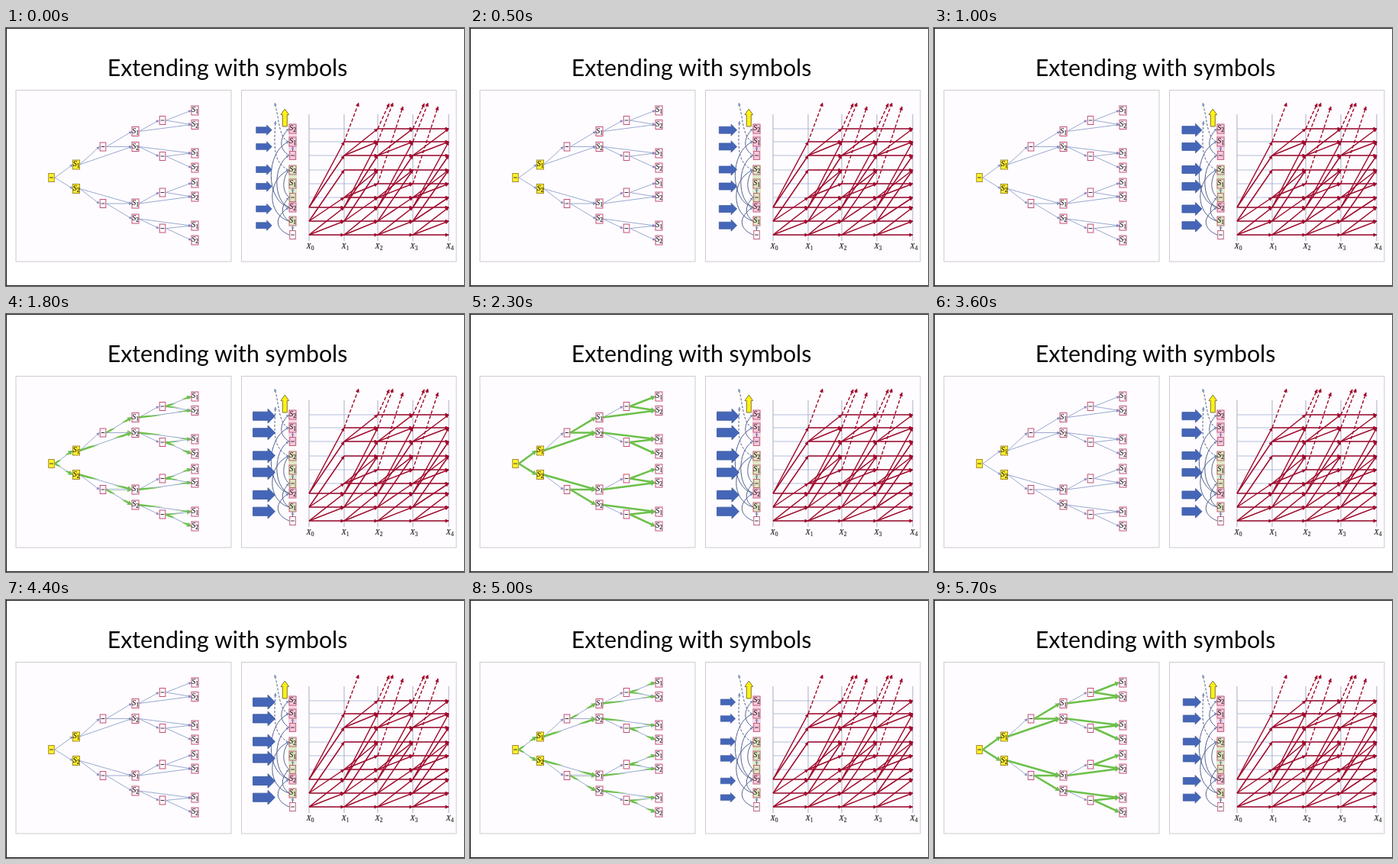
These frames come from a looping animation (600 px wide and 338 px high, 5.8 s). An HTML page:

```html
<!DOCTYPE html>
<html lang="en">
<head>
<meta charset="utf-8">
<title>Extending with symbols</title>
<style>
  html, body { margin: 0; width: 100%; height: 100%; overflow: hidden; background: #fff; }
  svg { display: block; width: 100vw; height: 100vh; }
  .title { font: 30.3px Lato, "Open Sans", sans-serif; text-anchor: middle; fill: #080808; }
  .math { font: italic 10px "Liberation Serif", "Noto Serif", serif; text-anchor: middle; fill: #222; stroke: #222; stroke-width: .15; }
  .math .sub { font-size: 7.5px; font-style: normal; }
</style>
</head>
<body>
<svg id="stage" viewBox="0 0 600 338" preserveAspectRatio="none">
  <defs>
    <linearGradient id="split" x1="0" y1="1" x2="0" y2="0">
      <stop stop-color="#6cc04a"/>
      <stop id="lowFull" stop-color="#6cc04a"/>
      <stop id="lowEdge" stop-color="#6cc04a" stop-opacity="0"/>
      <stop id="highEdge" stop-color="#6cc04a" stop-opacity="0"/>
      <stop id="highFull" stop-color="#6cc04a"/>
    </linearGradient>
    <marker id="redHead" viewBox="0 0 6 6" refX="5.5" refY="3" markerWidth="5" markerHeight="5" markerUnits="userSpaceOnUse" orient="auto">
      <path d="M0 0L6 3L0 6z" fill="#a00a2c"/>
    </marker>
    <marker id="blueHead" viewBox="0 0 6 6" refX="5.5" refY="3" markerWidth="4" markerHeight="4" markerUnits="userSpaceOnUse" orient="auto">
      <path d="M0 0L6 3L0 6z" fill="#7f90bd"/>
    </marker>
  </defs>
  <path d="M0 .5H600M.5 0V338M0 337.5H600" stroke="#222" fill="none"/>
  <text class="title" x="290" y="63.4">Extending with symbols</text>
  <g fill="#fefcfe" stroke="#cfcad2">
    <rect x="13" y="81.5" width="282" height="224.5"/>
    <rect x="308.5" y="81.5" width="281.5" height="224.5"/>
  </g>
  <g id="tree"></g>
  <g id="trellis"></g>
  <g id="column"></g>
  <g id="inputs"></g>
</svg>
<script>
const LOOP = 5800;
const byId = id => document.getElementById(id);

function add(parent, tag, attrs, text) {
  const el = document.createElementNS("http://www.w3.org/2000/svg", tag);
  for (const key in attrs) el.setAttribute(key, attrs[key]);
  if (text) el.textContent = text;
  parent.append(el);
  return el;
}

function symbol(parent, letter, index, x, y) {
  const text = add(parent, "text", { class: "math", x, y });
  add(text, "tspan", {}, letter);
  add(text, "tspan", { class: "sub", dy: 2 }, String(index));
}

// kind 0 is the blank, 1 and 2 are the symbols
function node(parent, kind, x, y, fill, stroke) {
  const h = kind ? 12 : 11, w = kind ? 9 : 7.6;
  add(parent, "rect", { x: x - w / 2, y: y - h / 2, width: w, height: h, fill, stroke, "stroke-width": 1 });
  if (kind) symbol(parent, "S", kind, x, y + 2.4);
  else add(parent, "path", { d: `M${x - 2.3} ${y}h4.6`, stroke: "#333", "stroke-width": 1 });
}

function blockArrow(x1, y1, x2, y2, half, headLength, headHalf) {
  const length = Math.hypot(x2 - x1, y2 - y1);
  const ux = (x2 - x1) / length, uy = (y2 - y1) / length;
  const neck = length - headLength;
  const points = [[0, -half], [neck, -half], [neck, -headHalf], [length, 0], [neck, headHalf], [neck, half], [0, half]];
  return "M" + points.map(([a, b]) => `${(x1 + a * ux - b * uy).toFixed(2)} ${(y1 + a * uy + b * ux).toFixed(2)}`).join("L") + "z";
}

function buildTree() {
  const tree = byId("tree");
  const lines = add(tree, "g", { stroke: "#9aaad2", "stroke-width": 1, "marker-end": "url(#blueHead)" });
  const greens = add(tree, "g", { fill: "url(#split)" });
  const boxes = add(tree, "g", {});

  function link(a, b) {
    const x1 = a.x + 4.5, x2 = b.x - 4.7;
    add(lines, "line", { x1, y1: a.y, x2, y2: b.y });
    if (b.kind) add(greens, "path", { d: blockArrow(x1, a.y, x2, b.y, 1.25, 5.5, 3.4) });
  }
  function place(kind, x, y, yellow) {
    node(boxes, kind, x, y, yellow ? "#fff22a" : "#fffafd", yellow ? "#a58a35" : "#c2507a");
    return { kind, x, y };
  }
  // a symbol leads to a blank and, directly, to the other symbol
  function extend(from, blankX, blankY, symbolX, ys) {
    const blank = place(0, blankX, blankY);
    const pair = ys.map((y, i) => place(i + 1, symbolX, y));
    link(from, blank);
    pair.forEach(p => link(blank, p));
    link(from, pair[2 - from.kind]);
    return pair;
  }

  const root = place(0, 59.5, 196, true);
  const s1 = place(1, 92, 179, true), s2 = place(2, 92, 210.5, true);
  link(root, s1);
  link(root, s2);
  const top = extend(s1, 127, 155.5, 169.5, [135.5, 155.5]);
  const bottom = extend(s2, 127, 230, 169.5, [230, 250]);
  extend(top[0], 205, 121, 247.5, [108, 126.5]);
  extend(top[1], 205, 168, 247.5, [164, 183]);
  extend(bottom[0], 205, 215.5, 247.5, [203, 221]);
  extend(bottom[1], 205, 262.5, 247.5, [259, 278]);
  return greens;
}

const rows = [271, 253, 235, 222, 204, 186, 167, 149, 132];

function buildTrellis() {
  const trellis = byId("trellis");
  const xs = [397, 443, 487, 533, 580];
  const firstColumn = [0, 0, 0, 1, 2, 1, 1, 1, 2];
  const climbs = [[0, 1], [0, 2], [1, 3], [1, 5], [2, 6], [2, 7], [3, 4], [3, 5], [6, 7], [6, 8]];

  const grid = add(trellis, "g", { stroke: "#b3bfdc", "stroke-width": 1 });
  rows.forEach(y => add(grid, "line", { x1: xs[0], y1: y, x2: xs[4], y2: y }));
  xs.forEach((x, i) => {
    add(grid, "line", { x1: x, y1: 113, x2: x, y2: 279, stroke: "#a9afc2" });
    symbol(trellis, "X", i, x + 1.5, 289);
  });

  const red = add(trellis, "g", { stroke: "#a00a2c", "stroke-width": 1.5, "marker-end": "url(#redHead)" });
  const dashed = add(trellis, "g", { stroke: "#a00a2c", "stroke-width": 1.4, "stroke-dasharray": "4.5 2.5", "marker-end": "url(#redHead)" });
  for (let c = 0; c < 4; c++) {
    const step = (a, b) => {
      if (firstColumn[a] <= c) add(red, "line", { x1: xs[c], y1: rows[a], x2: xs[c + 1], y2: rows[b] });
    };
    rows.forEach((_, r) => step(r, r));
    climbs.forEach(([a, b]) => step(a, b));
    const leave = (row, dx, y) => add(dashed, "line", { x1: xs[c], y1: rows[row], x2: xs[c] + dx, y2: y });
    if (c === 1) leave(7, 19, 98);
    if (c > 1) {
      leave(8, 15, 99);
      leave(7, 20, 98);
      leave(4, 33, 103);
    }
  }
}

function buildColumn() {
  const column = byId("column");
  const x = 375.5;
  const pink = "#f6c9dc", green = "#dbe7bd";
  add(column, "rect", { x: 370, y: 126, width: 11, height: 47, fill: "#f9d6e5" });
  add(column, "rect", { x: 370, y: 180, width: 11, height: 48, fill: "#e0eac6" });

  const curves = add(column, "g", { fill: "none", stroke: "#53648f", "stroke-width": 1 });
  const bend = (from, to, reach) =>
    add(curves, "path", { d: `M371 ${from}C${x - reach} ${from - 8} ${x - reach} ${to + 12} 370.5 ${to}`, "marker-end": "url(#blueHead)" });
  bend(271, 235, 24);
  bend(253, 222, 16);
  bend(253, 186, 34);
  bend(235, 167, 26);
  bend(235, 149, 36);
  bend(222, 186, 14);
  bend(167, 132, 18);
  [[266, 259], [216, 210], [162, 155]].forEach(([y1, y2]) =>
    add(curves, "line", { x1: x, y1, x2: x, y2, "marker-end": "url(#blueHead)" }));
  const dashes = { "stroke-dasharray": "3 2", "marker-end": "url(#blueHead)" };
  add(curves, "path", { d: "M370 149C357 144 358 118 352 98", ...dashes });
  add(curves, "path", { d: "M370 186C350 176 351 158 353 122", ...dashes });

  const fills = ["#fffafd", green, pink, green, green, green, pink, pink, pink];
  const kinds = [0, 1, 2, 0, 1, 2, 0, 1, 2];
  rows.forEach((y, r) => node(column, kinds[r], x, y, fills[r], "#c0607f"));
  add(column, "path", { d: blockArrow(365.3, 129, 365.3, 106, 3, 7.5, 5.3), fill: "#fff212", stroke: "#80743c", "stroke-width": 1 });
}

function buildInputs() {
  return [133.7, 155.4, 185.5, 207.5, 237, 258.7].map(y => {
    const el = add(byId("inputs"), "path", {
      d: blockArrow(-9.6, 0, 9.6, 0, 3.7, 6.2, 6.2), fill: "#4566b8", stroke: "#3c5a9e", "stroke-width": 0.6
    });
    return { el, y };
  });
}

const greens = buildTree();
buildTrellis();
buildColumn();
const inputs = buildInputs();

const clamp = v => Math.max(0, Math.min(1, v));

function draw(t) {
  // input arrows grow to half as large again, hold, then snap back
  const scale = 1 + 0.5 * clamp((t + 250) % 2600 / 1750);
  inputs.forEach(({ el, y }) => el.setAttribute("transform", `translate(338 ${y}) scale(${scale})`));

  // green links close in from top and bottom, hold, then vanish
  const phase = (t + 1900) % 3200;
  const shown = t >= 1300 && phase < 1900;
  const front = 0.5 * clamp(phase / 1000);
  const edge = Math.min(0.5, front + 0.1);
  const offsets = { lowFull: front, lowEdge: edge, highEdge: 1 - edge, highFull: 1 - front };
  for (const id in offsets) byId(id).setAttribute("offset", offsets[id]);
  greens.setAttribute("visibility", shown ? "visible" : "hidden");
}

const start = performance.now();
function tick() {
  draw((performance.now() - start) % LOOP);
  requestAnimationFrame(tick);
}
draw(0);
requestAnimationFrame(tick);
</script>
</body>
</html>
```
